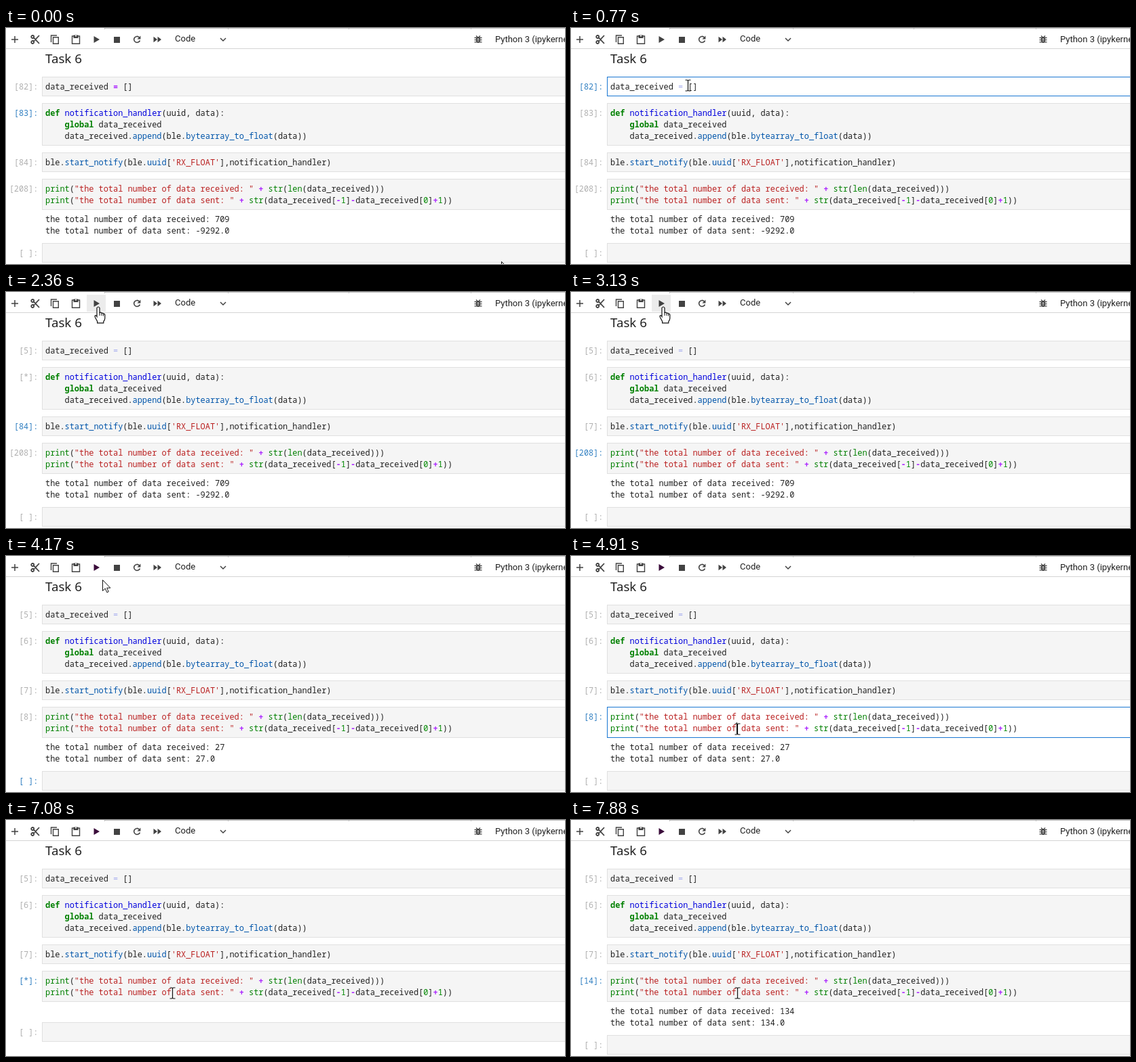
Recreate the animation shown at these times as an HTML page with a canvas. Size 824 by 349 pixels, loop 8000 ms.

```html
<!DOCTYPE html>
<html lang="en">
<head>
<meta charset="utf-8">
<title>Notebook run</title>
<style>
html, body { margin: 0; width: 100%; height: 100%; overflow: hidden; background: #fff; }
canvas { display: block; }
</style>
</head>
<body>
<canvas id="stage" width="824" height="349"></canvas>
<script>
const ctx = document.getElementById('stage').getContext('2d');
const LOOP = 8000;
const MONO = '11.92px "Noto Sans Mono", "DejaVu Sans Mono", monospace';
const UI = '13px Roboto, "Liberation Sans", sans-serif';
const ICON = '#424242';

const cells = [
  { y: 72, lines: ['data_received = []'] },
  { y: 111, lines: [
    'def notification_handler(uuid, data):',
    '    global data_received',
    '    data_received.append(ble.bytearray_to_float(data))'] },
  { y: 184, lines: ["ble.start_notify(ble.uuid['RX_FLOAT'],notification_handler)"] },
  { y: 223, lines: [
    'print("the total number of data received: " + str(len(data_received)))',
    'print("the total number of data sent: " + str(data_received[-1]-data_received[0]+1))'] },
  { y: 318, lines: [''] }
];
const cellHeight = cell => cell.lines.length * 17 + 12;

// Notebook state changes: [time, changes]; n0..n4 are the cell prompts.
const events = [
  [0, { n0: '82', n1: '83', n2: '84', n3: '208', n4: ' ', active: 1, edit: -1, caret: false,
        received: '709', sent: '-9292.0', cleared: false }],
  [680, { active: 0, edit: 0 }],
  [1750, { n0: '*', active: 1, edit: -1 }],
  [1880, { n0: '5' }],
  [2360, { n1: '*', active: 2 }],
  [2440, { n1: '6' }],
  [2840, { n2: '*', active: 3 }],
  [3130, { n2: '7' }],
  [3780, { n3: '*', active: 4, cleared: true }],
  [3870, result(8, 27)],
  [4830, { active: 3, edit: 3 }],
  [4910, { caret: true }],
  [5380, { caret: false }],
  [5840, { caret: true }],
  [6060, { n3: '*', edit: -1, caret: false }],
  [6140, { cleared: true }],
  [6220, result(9, 100)],
  [6470, { n3: '*', cleared: true }],
  [6550, result(10, 108)],
  [6850, { n3: '*', cleared: true }],
  [6930, result(11, 116)],
  [7080, { n3: '*', cleared: true }],
  [7180, result('*', 121)],
  [7250, { n3: '12' }],
  [7560, { n3: '*', cleared: true }],
  [7640, result(13, 129)],
  [7780, { n3: '*', cleared: true }],
  [7880, result(14, 134)]
];

// Pointer moves: [first step, last step, steps, x, y]
const moves = [
  [70, 530, 7, 173, 87],
  [760, 1410, 9, 133, 22],
  [1520, 1520, 1, 136, 22],
  [4170, 4670, 7, 245, 256]
];

function result(n, count) {
  return { n3: String(n), received: String(count), sent: count + '.0', cleared: false };
}

function stateAt(t) {
  const s = {};
  for (const [time, change] of events) if (time <= t) Object.assign(s, change);
  return s;
}

function pointerAt(t) {
  let x = 730, y = 345;
  for (const [start, end, n, tx, ty] of moves) {
    if (t < start) break;
    const gap = (end - start) / Math.max(1, n - 1) || 1;
    const u = Math.min(n, Math.floor((t - start) / gap + 1e-6) + 1) / n;
    const e = u * u * (3 - 2 * u);
    x += (tx - x) * e;
    y += (ty - y) * e;
  }
  return { x, y };
}

function text(str, x, y, font, color, align = 'left') {
  ctx.font = font;
  ctx.fillStyle = color;
  ctx.textAlign = align;
  ctx.fillText(str, x, y);
}

function rect(x, y, w, h, color) {
  ctx.fillStyle = color;
  ctx.fillRect(x, y, w, h);
}

function shape(d, x, y, fill, stroke, width = 1.4) {
  const p = new Path2D(d);
  ctx.save();
  ctx.translate(x, y);
  if (fill) { ctx.fillStyle = fill; ctx.fill(p); }
  if (stroke) { ctx.strokeStyle = stroke; ctx.lineWidth = width; ctx.stroke(p); }
  ctx.restore();
}

const TOKEN = /(?<str>"[^"]*"|'[^']*')|(?<key>\b(?:def|global)\b)|(?<def>(?<=def )\w+)|(?<fn>\b(?:print|str|len)\b)|(?<prop>(?<=\.)\w+)|(?<op>[-+=])|(?<num>\b\d+)|(?<name>\w+)|(?<other>[^\w"']+?)/g;
const COLORS = { str: '#ba2121', key: '#008000', def: '#0000dd', fn: '#008000', prop: '#0055aa',
                 op: '#aa22ff', num: '#008800', name: '#212121', other: '#212121' };

function code(line, x, y, paleOp) {
  ctx.font = MONO;
  const step = ctx.measureText('0').width;
  for (const m of line.matchAll(TOKEN)) {
    const kind = Object.keys(m.groups).find(k => m.groups[k] !== undefined);
    const pale = paleOp && m[0] === '=';
    const bold = kind === 'key' || kind === 'op' && !pale;
    text(m[0], x + m.index * step, y, (bold ? 'bold ' : '') + MONO, pale ? '#a9b0ee' : COLORS[kind]);
  }
}

function drawToolbar(t, hover) {
  rect(145, 0, 679, 1, '#c4c4c4');
  for (const x of [145, 327, 505, 685]) rect(x, 0, 1, 2, '#bdbdbd');
  rect(0, 30, 824, 1, '#d4d4d4');
  if (hover) rect(119, 4, 28, 25, '#ececec');

  shape('M-5 0H5M0 -5V5', 13, 17, null, ICON, 1.5);
  shape('M-1.8 -4A2 2 0 1 1 -5.8 -4A2 2 0 1 1 -1.8 -4M-1.8 4A2 2 0 1 1 -5.8 4A2 2 0 1 1 -1.8 4' +
        'M-2.4 -2.8L6 6M-2.4 2.8L6 -6', 43, 17, null, ICON, 1.8);
  shape('M-5.5 4V-6H3M-2.5 -3.2H5.3V6.3H-2.5Z', 72, 17, null, ICON);
  shape('M-5.5 -5H5.5V6.3H-5.5Z', 103, 17, null, ICON);
  rect(99.5, 10.5, 7, 4.5, ICON);
  rect(102, 11, 2, 1.4, '#fff');
  shape('M-4 -5L4.5 0L-4 5Z', 133.5, 17, t >= 4170 ? '#3a0c3a' : ICON);
  rect(159, 13, 9, 9, ICON);
  shape('M3.3 -3.3A4.5 4.5 0 1 0 4.4 1.4', 193, 17, null, ICON, 1.6);
  shape('M5.4 -5.5V-0.5H0.4Z', 193, 17, ICON);
  shape('M-5.5 -4.2L0 0L-5.5 4.2ZM0.5 -4.2L6 0L0.5 4.2Z', 223, 17, ICON);
  text('Code', 249, 20, UI, '#212121');
  shape('M-4 -2L0 2L4 -2', 320, 17, null, ICON, 1.5);
  shape('M-3 -2.5Q0 -5.5 3 -2.5V2.5Q0 7.5 -3 2.5Z', 696, 17, ICON);
  shape('M-5.5 -2.5H5.5M-5.5 0.7H5.5M-5.5 3.8H5.5M-3 -5.5L-1 -3.5M3 -5.5L1 -3.5', 696, 17, null, ICON, 1.3);
  shape('M-1.4 -0.6H1.4M-1.4 2H1.4', 696, 17, null, '#fff', 1.1);
  text('Python 3 (ipykernel)', 721, 21, UI, '#212121');
}

function drawCell(cell, i, s, t) {
  const y = i === 4 && s.cleared ? 299 : cell.y;
  const h = cellHeight(cell);
  const editing = s.edit === i;
  rect(53, y, 780, h, editing ? '#1976d2' : '#e0e0e0');
  rect(54, y + 1, 780, h - 2, editing ? '#fff' : '#f5f5f5');
  text(`[${s['n' + i]}]:`, 47.5, y + 19, MONO, s.active === i ? '#307fc1' : '#b0b0b0', 'right');
  cell.lines.forEach((line, k) => code(line, 58, y + 19 + 17 * k, t >= 680));
}

function drawPointer({ x, y }, hover) {
  const onCode = x > 53 && cells.some(c => y > c.y && y < c.y + cellHeight(c) - 4);
  x = Math.round(x);
  y = Math.round(y);
  if (hover) {
    shape('M-2 1.5Q0 -1.5 2 1.5V8.5Q4 7.5 5 9.3Q7 8.6 7.6 10.2Q9.6 9.8 9.8 12V17Q9.6 20 7.8 21.5V23.8H-1.4' +
          'V21.5L-4.6 15.5Q-5.6 12.8 -4 12.6Q-3 12.6 -2 14.4Z', x, y, '#fff', '#111', 1.2);
    shape('M2 8V13M5 9.5V13M7.6 10.5V13.5', x, y, null, '#111', 1);
  } else if (onCode) {
    shape('M-3.5 -8H-1Q0 -8 0.5 -7Q1 -8 2 -8H4.5M-3.5 8H-1Q0 8 0.5 7Q1 8 2 8H4.5M0.5 -7V7', x, y, null, '#111', 1.2);
  } else {
    shape('M0.5 0.5V16.5L4.2 13L6.8 18.8L9.2 17.8L6.7 12.2H11.8Z', x, y, '#fff', '#111', 1);
  }
}

function draw(t) {
  const s = stateAt(t);
  const p = pointerAt(t);
  const hover = p.x > 119 && p.x < 147 && p.y > 4 && p.y < 29;
  rect(0, 0, 824, 349, '#fff');
  drawToolbar(t, hover);
  text('Task 6', 58, 52, '500 18.7px "Noto Sans", "Open Sans", sans-serif', '#212121');
  cells.forEach((cell, i) => drawCell(cell, i, s, t));
  if (!s.cleared) {
    text('the total number of data received: ' + s.received, 58, 287, MONO, '#212121');
    text('the total number of data sent: ' + s.sent, 58, 304, MONO, '#212121');
  }
  if (s.caret) rect(244, 246, 1, 17, '#111');
  drawPointer(p, hover);
}

const begin = performance.now();
function frame() {
  draw((performance.now() - begin) % LOOP);
  requestAnimationFrame(frame);
}
frame();
</script>
</body>
</html>
```
